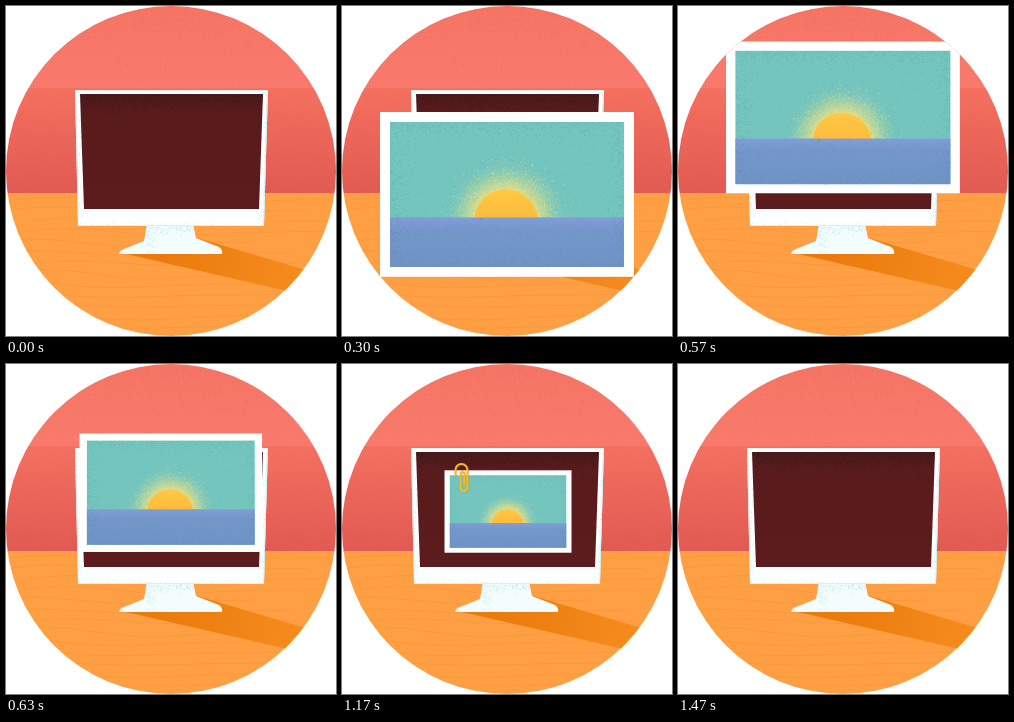
Recreate the animation shown at these times as an HTML page. Size 330 px wide and 330 px high, loop 1830 ms.

```html
<!DOCTYPE html>
<html lang="en">
<head>
<meta charset="utf-8">
<title>Sunset picture</title>
<style>
  html, body { margin: 0; width: 100%; height: 100%; overflow: hidden; background: #fff; }
  svg { display: block; width: 100vw; height: 100vh; }
</style>
</head>
<body>
<svg viewBox="0 0 330 330">
  <defs>
    <clipPath id="disc"><circle cx="165" cy="165" r="165"/></clipPath>
    <clipPath id="body"><path d="M69 84H262L258 220H72Z"/></clipPath>
    <clipPath id="pane"><rect x="-117" y="-72.5" width="234" height="145"/></clipPath>
    <linearGradient id="wallTop" x2="0" y2="1">
      <stop offset="0" stop-color="#f57565"/><stop offset="1" stop-color="#f97a6c"/>
    </linearGradient>
    <linearGradient id="wallLow" x2="0" y2="1">
      <stop offset="0" stop-color="#f4705f"/><stop offset="1" stop-color="#e15a53"/>
    </linearGradient>
    <linearGradient id="shade" gradientUnits="userSpaceOnUse" x1="150" y1="243" x2="290" y2="274">
      <stop offset="0" stop-color="#ea7a0c"/><stop offset="1" stop-color="#f68b1d"/>
    </linearGradient>
    <linearGradient id="dark" x2="0" y2="1">
      <stop offset="0" stop-color="#491a1b"/><stop offset=".16" stop-color="#5a1b1d"/>
      <stop offset="1" stop-color="#5c1b1d"/>
    </linearGradient>
    <linearGradient id="sea" x2="0" y2="1">
      <stop offset="0" stop-color="#819dd8"/><stop offset=".25" stop-color="#7497ca"/>
      <stop offset="1" stop-color="#7093c6"/>
    </linearGradient>
    <radialGradient id="glow">
      <stop offset=".45" stop-color="#f3e182" stop-opacity=".95"/>
      <stop offset=".7" stop-color="#c9da94" stop-opacity=".5"/>
      <stop offset="1" stop-color="#74c5be" stop-opacity="0"/>
    </radialGradient>
    <linearGradient id="sun" x2="0" y2="1">
      <stop offset="0" stop-color="#ffc845"/><stop offset=".5" stop-color="#ffb93b"/>
    </linearGradient>
  </defs>

  <g clip-path="url(#disc)">
    <rect width="330" height="83" fill="url(#wallTop)"/>
    <rect y="82" width="330" height="106" fill="url(#wallLow)"/>
    <path id="wallGrain" fill="#d94f4b" opacity=".3"/>
    <rect y="187" width="330" height="143" fill="#ff9f43"/>
    <path id="wood" fill="none" stroke="#f2913a" stroke-width=".7" opacity=".7"/>
    <path d="M120 248L188 231L300 264L330 300H330L277 284Z" fill="url(#shade)"/>

    <path d="M141 218H187L190 232L213 241Q217 244 216 248H113Q114 244 118 243L138 235Z" fill="#f4fdfd"/>
    <path id="standGrain" fill="#a9dfe2" opacity=".7"/>
    <path d="M69 84H262L258 220H72Z" fill="#fbffff"/>
    <path d="M69.6 84.5H261.4L257.5 219.5H72.5Z" fill="none" stroke="#d9f3f3"/>
    <path id="bodyGrain" fill="#a9dfe2" opacity=".7" clip-path="url(#body)"/>
    <path d="M74 88H257L253 203H78Z" fill="url(#dark)"/>
    <path id="screenGrain" fill="#351213" opacity=".45"/>

    <g id="mask">
      <g id="moving">
        <g id="photo">
          <rect x="-127" y="-82.4" width="254" height="164.8" fill="#fff"/>
          <g clip-path="url(#pane)">
            <rect x="-117" y="-73" width="234" height="146" fill="#74c5be"/>
            <circle cx="-1" cy="26" r="62" fill="url(#glow)"/>
            <path id="skyGrain" fill="#4fa9a5" opacity=".5"/>
            <path id="glowGrain" fill="#f0e387" opacity=".7"/>
            <circle cx="-1" cy="27" r="32" fill="url(#sun)"/>
            <rect x="-117" y="23" width="234" height="50" fill="url(#sea)"/>
            <path id="seaGrain" fill="#5e7fb9" opacity=".5"/>
          </g>
        </g>
        <g id="pin" fill="none" stroke-linecap="round" stroke-width="2">
          <path id="pinShade" stroke="#b9791a" opacity=".35" transform="translate(.7 .6)"/>
          <path id="pinWire" stroke="#fdb818"/>
        </g>
      </g>
    </g>
  </g>
</svg>
<script>
const $ = id => document.getElementById(id);
const LOOP = 1830, STEP = 30;

let seed = 11;
const rnd = () => (seed = seed * 16807 % 2147483647) / 2147483647;

// Scatter specks in a box; keep(x, y) is the chance that one stays.
function grain(id, n, x, y, w, h, keep, size = 0.8) {
  let d = '';
  for (let i = 0; i < n; i++) {
    const px = x + rnd() * w, py = y + rnd() * h;
    if (rnd() < keep(px, py)) d += `M${px.toFixed(1)} ${py.toFixed(1)}h${size}v${size}h-${size}z`;
  }
  $(id).setAttribute('d', d);
}

const near = (dist, reach) => Math.max(0, 1 - dist / reach) ** 2;

grain('wallGrain', 7000, 0, 0, 330, 187, (x, y) => y < 82 ? near(y, 70) + 0.12 : 0.15 + (y - 82) / 260);
grain('bodyGrain', 6000, 69, 84, 193, 136, (x, y) => {
  const slant = (y - 84) / 40;
  return Math.max(near(x - 69 - slant, 9), near(262 - slant - x, 9), near(220 - y, 5) * 0.5);
});
grain('standGrain', 700, 141, 220, 46, 27, (x, y) => near(y - 220, 14) + near(x - 141, 14) * 0.6);
grain('screenGrain', 3000, 75, 88, 181, 40, (x, y) => near(y - 88, 36));
grain('skyGrain', 7000, -117, -73, 234, 96, (x, y) =>
  Math.max(near(117 - Math.abs(x), 26), near(y + 73, 26)) * 0.8 + 0.04, 0.9);
grain('glowGrain', 4000, -70, -45, 140, 68, (x, y) => near(Math.hypot(x + 1, y - 26) - 28, 44) * 0.7, 0.9);
grain('seaGrain', 4000, -117, 23, 234, 50, (x, y) =>
  Math.max(near(117 - Math.abs(x), 22), near(73 - y, 14)) * 0.7 + 0.05, 0.9);

let lines = '';
for (let i = 0; i < 13; i++) {
  const y = 194 + i * 10.5, x = rnd() * 70 - 40, b = 3 + rnd() * 5;
  lines += `M${x} ${y}q45 ${-b} 90 0t90 ${b / 2}t${80 + rnd() * 90} ${-b / 2}`;
}
$('wood').setAttribute('d', lines);

const wire = 'M112 110.5V106a6 6 0 0 1 12 0V123.5a3.4 3.4 0 0 1-6.8 0V110a1.9 1.9 0 0 1 3.8 0V120';
$('pinWire').setAttribute('d', wire);
$('pinShade').setAttribute('d', wire);

// Eased progress between two times, as a cubic Bezier (x1, 0, x2, 1).
function ease(t, from, to, x1, x2) {
  const u = Math.min(1, Math.max(0, (t - from) / (to - from)));
  let lo = 0, hi = 1;
  for (let i = 0; i < 22; i++) {
    const s = (lo + hi) / 2, r = 1 - s;
    if (3 * s * r * r * x1 + 3 * s * s * r * x2 + s ** 3 < u) lo = s; else hi = s;
  }
  return lo * lo * (3 - 2 * lo);
}

const mix = (a, b, p) => a + (b - a) * p;

function render(t) {
  const rise = ease(t, 120, 420, 0.5, 0.45);
  const shrink = ease(t, 480, 750, 0.585, 0.488);
  const drop = ease(t, 840, 960, 0.3, 0.4);
  const leave = ease(t, 1140, 1470, 0.58, 0.6);

  const cx = mix(165, 164.6, shrink);
  const cy = mix(mix(413.5, 104.6, rise), 147.5, shrink);
  $('photo').setAttribute('transform', `translate(${cx} ${cy}) scale(${mix(1, 0.5, shrink)})`);

  $('pin').setAttribute('transform', `translate(0 ${mix(-12, 0, drop)})`);
  $('pin').setAttribute('opacity', Math.min(1, drop * 2));

  $('moving').setAttribute('transform', `translate(${162 * leave} ${2 * leave})`);
  $('mask').setAttribute('clip-path', t >= 1140 ? 'url(#body)' : 'none');
  $('mask').setAttribute('visibility', t >= 150 && t < 1470 ? 'visible' : 'hidden');
}

const start = performance.now();
function frame() {
  const t = (performance.now() - start) % LOOP;
  render(Math.floor(t / STEP) * STEP);
  requestAnimationFrame(frame);
}
frame();
</script>
</body>
</html>
```
